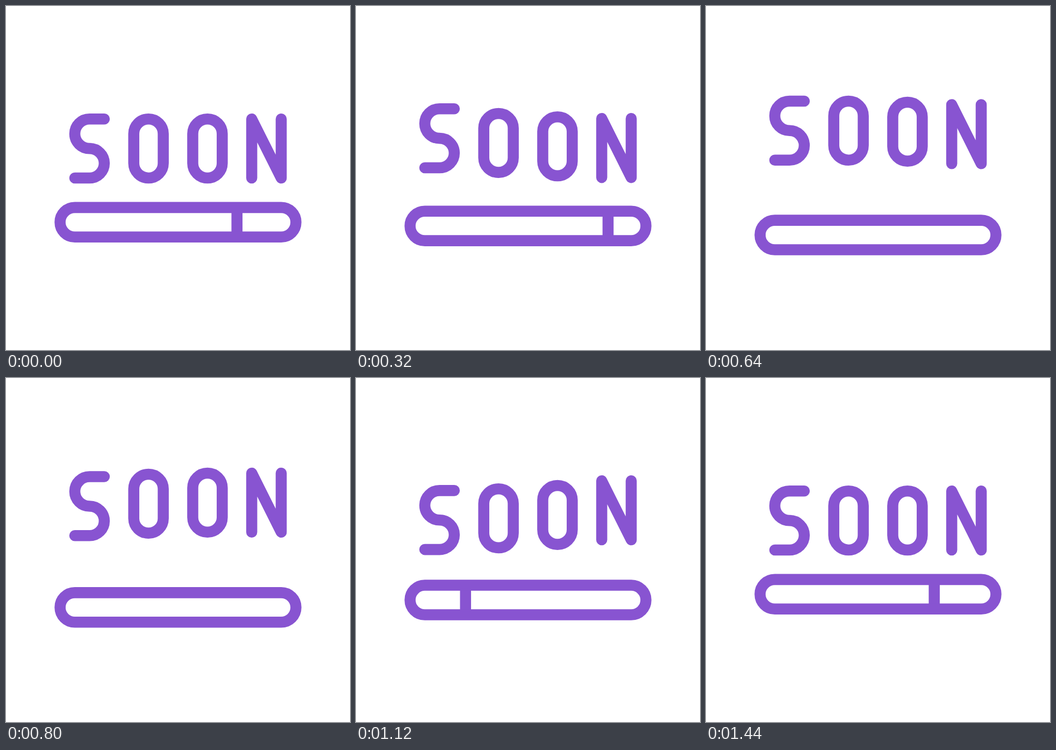
An HTML page for the animation above (1480 ms loop, 640 px wide and 640 px high).

```html
<!DOCTYPE html>
<html lang="en">
<head>
<meta charset="utf-8">
<title>Soon</title>
<style>
  html, body { margin: 0; width: 100%; height: 100%; overflow: hidden; background: #fff; }
  svg { display: block; width: 100vw; height: 100vh; }
</style>
</head>
<body>
<svg viewBox="0 0 640 640">
  <defs>
    <clipPath id="slot"><rect x="-8" y="2" width="16" height="2" rx="1"/></clipPath>
  </defs>
  <g transform="translate(320 320) scale(27.43)" fill="none" stroke="#8854d1"
     stroke-width=".75" stroke-linecap="round" stroke-linejoin="round">
    <path class="letter" d="M-5-4H-6a1 1 0 0 0 0 2a1 1 0 0 1 0 2H-7"/>
    <rect class="letter" x="-3" y="-4" width="2" height="4" rx="1"/>
    <rect class="letter" x="1" y="-4" width="2" height="4" rx="1"/>
    <path class="letter" d="M5 0V-4L7 0V-4"/>
    <g id="bar">
      <g clip-path="url(#slot)"><path id="tick" d="M0 2V4"/></g>
      <rect x="-8" y="2" width="16" height="2" rx="1"/>
    </g>
  </g>
</svg>
<script>
const LOOP = 1480, STEP = 40;
const letters = document.querySelectorAll('.letter');
const bar = document.getElementById('bar');
const tick = document.getElementById('tick');

// cubic-bezier(.5, 0, .5, 1)
function ease(x) {
  let s = x;
  for (let i = 0; i < 8; i++) {
    s -= (1.5 * s - 1.5 * s * s + s * s * s - x) / (1.5 - 3 * s + 3 * s * s);
  }
  return s * s * (3 - 2 * s);
}

// Out and back again, each way lasting `half` ms.
function swing(t, start, half) {
  return ease(Math.max(0, 1 - Math.abs(t - start - half) / half));
}

// The tick leaves on the right, then comes in again from the left.
function tickX(t) {
  if (t < 500) return Math.min(8, 4 + 1.43 * (t / 320) ** 2.5);
  return Math.max(-8, 4.083 - 5.47e-5 * (1510 - t) ** 2);
}

function move(el, x, y) {
  el.setAttribute('transform', `translate(${x.toFixed(4)} ${y.toFixed(4)})`);
}

function draw(time) {
  const t = Math.floor((time % LOOP) / STEP) * STEP;
  letters.forEach((el, i) => move(el, 0, -1.222 * swing(t, i * 80, 600)));
  move(bar, 0, 0.9 * swing(t, 53, 696));
  move(tick, tickX(t), 0);
}

const start = performance.now();
function loop() {
  draw(performance.now() - start);
  requestAnimationFrame(loop);
}
loop();
</script>
</body>
</html>
```
